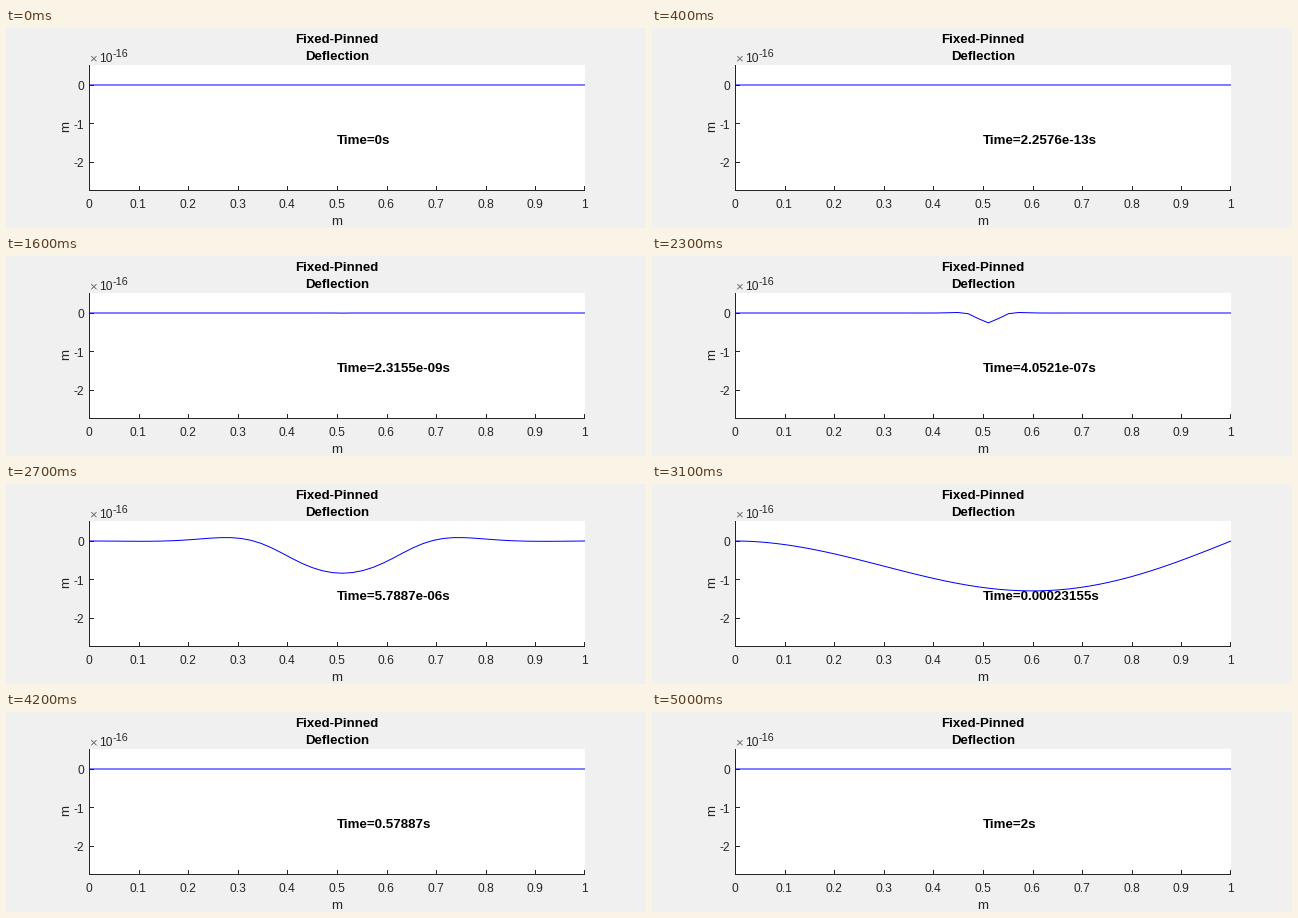
A matplotlib script for the animation above (5100 ms loop, 640 by 200 pixels).

```python
import numpy as np
import matplotlib.pyplot as plt
from matplotlib.animation import FuncAnimation
from matplotlib.patches import Rectangle

plt.rcParams["font.family"] = "Liberation Sans"

W, H, DPI = 640, 200, 100
PX = 72 / DPI                                # points per pixel
LEFT, RIGHT, BOTTOM = 83.5, 579.5, 162.5
ZERO, UNIT = 57.0, 38.65                     # zero level, pixels per 1e-16 m
GREY = "#262626"

# Beam model and solver settings
NODES, HIT = 50, 25                          # node count, struck node
STIFF = 950.0                                # sqrt(EI / rho A)
ACCEL = -40000.0                             # kick at t = 0
H0, H_MAX, T_END, STEPS = 1.7366e-14, 0.2, 2.0, 50
KAPPA = 0.185                                # first-order NDF coefficient


def beam_matrix():
    """State matrix of a beam clamped at the left and pinned at the right."""
    n = NODES - 2
    k = sum(c * np.eye(n, k=o) for o, c in zip(range(-2, 3), (1, -4, 6, -4, 1)))
    k[0, 0], k[-1, -1] = 7, 5
    k *= (STIFF * (NODES - 1) ** 2) ** 2
    zero = np.zeros((n, n))
    return np.block([[zero, np.eye(n)], [-k, zero]])


def simulate():
    """Implicit integration; the step grows tenfold after every third step."""
    a = beam_matrix()
    n = NODES - 2
    eye = np.eye(2 * n)
    y, diff = np.zeros(2 * n), np.zeros(2 * n)
    diff[n + HIT - 1] = H0 * ACCEL
    t, h, last = 0.0, H0, H0
    times, shapes = [t], [np.zeros(NODES)]
    for i in range(STEPS):
        if i and i % 3 == 0:
            h = min(10 * h, H_MAX)
        step = min(h, T_END - t)
        diff *= step / last
        diff = np.linalg.solve((1 + KAPPA) * eye - step * a,
                               step * (a @ y) + KAPPA * diff)
        y = y + diff
        t, last = min(t + step, T_END), step
        times.append(t)
        shapes.append(np.pad(y[:n], 1))
    return times, shapes


times, shapes = simulate()

fig = plt.figure(figsize=(W / DPI, H / DPI), dpi=DPI, facecolor="#f0f0f0")
ax = fig.add_axes([0, 0, 1, 1])
ax.set(xlim=(0, W), ylim=(H, 0))
ax.axis("off")


def label(x, y, s, size=12, color=GREY, ha="center", **kw):
    kw.setdefault("va", "baseline")
    return ax.text(x, y, s, fontsize=size * PX, color=color, ha=ha, **kw)


def rule(x, y):
    ax.plot(x, y, color=GREY, lw=PX, solid_capstyle="butt", snap=False, zorder=2)


ax.add_patch(Rectangle((83, 37), 496, 126, color="white", lw=0, zorder=1))
rule([83, 579], [BOTTOM, BOTTOM])
rule([LEFT, LEFT], [37, 163])

for i in range(11):
    x = LEFT + (RIGHT - LEFT) * i / 10
    tick = min(np.floor(x) + 0.5, 578.5)
    rule([tick, tick], [158, 163])
    label(x - 0.8, 180, f"{i / 10:g}")

for i in range(3):
    y = ZERO + UNIT * i
    tick = np.floor(y) + 0.5
    rule([83, 88], [tick, tick])
    label(78.5, y + 4.9, f"{-i}", ha="right")

label(330.6, 15, "Fixed-Pinned", 13.2, "black", weight="bold")
label(331.5, 32, "Deflection", 13.2, "black", weight="bold")
label(330.6, 197, "m", 13.2)
label(60.5, 99, "m", 13.2, rotation=90, va="center")
label(83, 34, "×", 13.2, "#6a6a6a", ha="left")
label(93, 34, "10", ha="left")
label(107, 29, "-16", 10.8, ha="left")

clock = label(331, 116, "", 13.33, "black", ha="left", weight="bold", zorder=4)
curve, = ax.plot([], [], color="blue", lw=PX, solid_capstyle="butt",
                 snap=False, zorder=3)
span = np.linspace(LEFT, 579, NODES)


def draw(i):
    curve.set_data(span, ZERO - UNIT * shapes[i] / 1e-16)
    clock.set_text(f"Time={times[i]:.5g}s")
    return curve, clock


anim = FuncAnimation(fig, draw, frames=STEPS + 1, interval=100,
                     repeat=True, repeat_delay=0)
plt.show()
```
